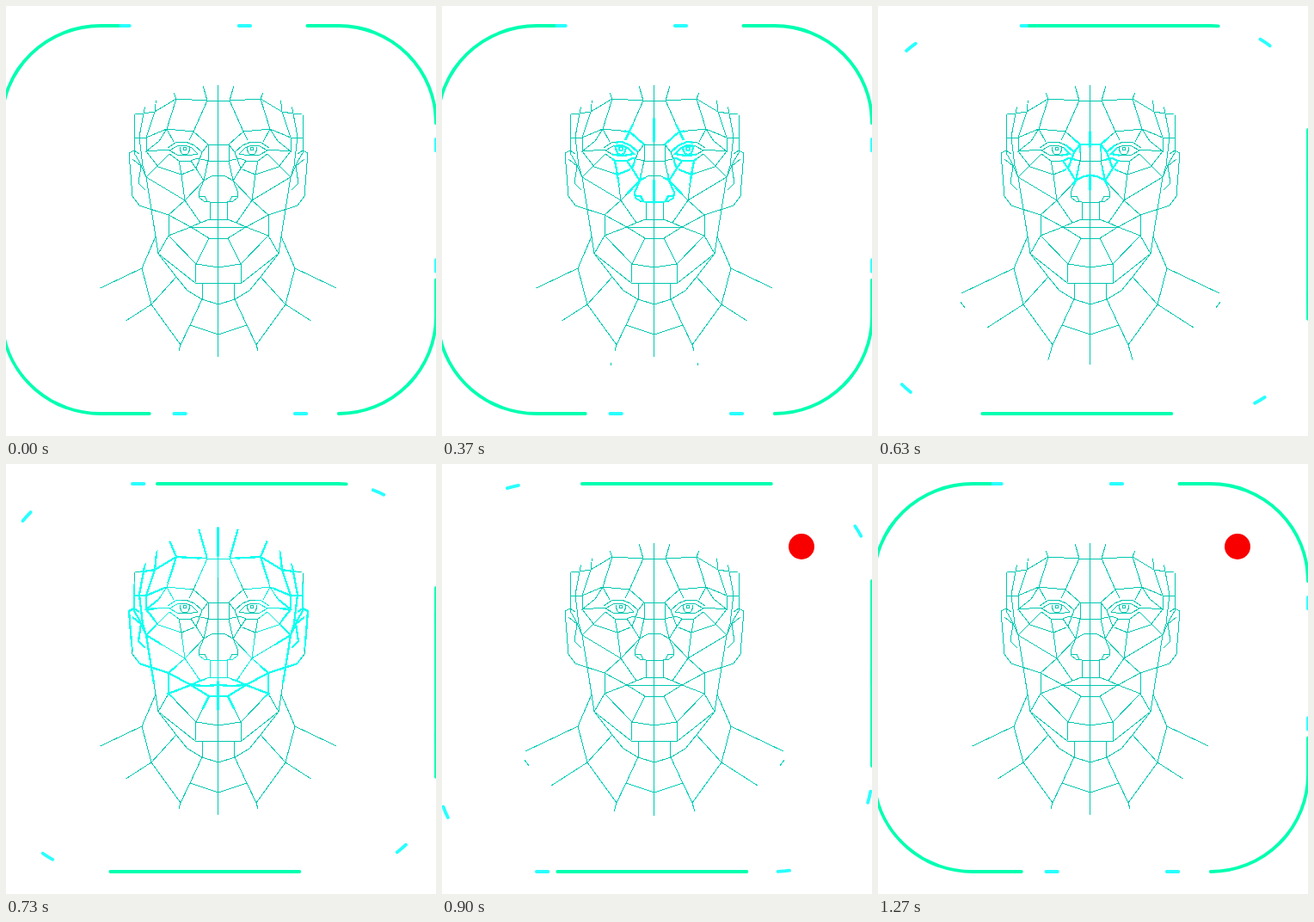
Recreate the animation shown at these times as an HTML page. Size 500 by 500 pixels, loop 1.41 s.

```html
<!DOCTYPE html>
<html lang="en">
<head>
<meta charset="utf-8">
<title>Face scan</title>
<style>
html, body { margin: 0; width: 100%; height: 100%; overflow: hidden; background: #fff; }
svg { display: block; width: 100vw; height: 100vh; }
path, circle { fill: none; }
#mesh { shape-rendering: crispEdges; }
.ring circle { stroke: #fff; }
#green, #cyan { stroke-width: 3.8; stroke-linecap: round; }
</style>
</head>
<body>
<svg viewBox="0 0 500 500">
  <defs>
    <g id="half">
      <!-- skull -->
      <path d="M149 171V125L150 80 172 53 205 44 247 38M186 34 172 53 180 65 198 108 187 143
        M200 30 205 44 222 68 234 110 218 146M205 44 180 65 167 89 160 125 155 152 159 186 163 199
        M150 80 176 95 194 80 222 68 247 63M176 95 173 123 163 153M149 125H160L173 123 198 108 234 110H247
        M149 153H163L187 143 218 146 235 161H247M163 153V169"/>
      <!-- ear -->
      <path d="M155 172 149 168 143 171 147 221 155 232M147 178 157 186 154 206 162 214M149 171 155 181 163 199"/>
      <!-- eye -->
      <path d="M187 143 178 157 163 169 190 167M187 143 195 158M218 146 213 156M188 165 197 159 209 158 219 162 228 170
        M190 168 199 163 209 162 216 165 223 172 211 174 199 173 190 168M190 172 201 180H215L222 177
        M202 164Q203 173 208 173T214 164"/>
      <circle cx="208" cy="166" r="2"/>
      <!-- cheek -->
      <path d="M163 169 177 187 204 196 219 190M190 172 163 199 208 226 189 243M201 180 204 196 208 226 230 203M208 226 226 252
        M155 232 189 243 215 257M163 199 174 268 177 288M215 180 221 189"/>
      <!-- nose -->
      <path d="M235 161 228 170 221 189 230 203 239 198 247 197M235 161V180L230 203 224 217 225 223 230 227 237 228H247M235 180H247
        M224 221H231L234 227M237 228V248M222 177 235 180"/>
      <!-- mouth and chin -->
      <path d="M189 243V267L177 288 220 322H247M226 252 237 248 247 249M215 257 226 252M215 257 232 258 247 257
        M215 257 236 270H247M215 257 189 267 221 300 247 304M236 270 221 300 220 322"/>
      <!-- neck -->
      <path d="M177 288 198 315 211 331 228 341 247 347M229 323 228 341 214 371 203 394 196 418M214 371 247 382
        M174 268 158 305 97 334M158 305 169 347 127 374M198 315 169 347 203 394M96 344 101 351"/>
    </g>
    <g id="mesh">
      <use href="#half"/>
      <use href="#half" transform="matrix(-1 0 0 1 494 0)"/>
      <path d="M246.5 13V418"/>
    </g>
    <g id="waves"><circle cx="247" cy="180"/><circle cx="247" cy="180"/><circle cx="247" cy="180"/></g>
    <mask id="seen" maskUnits="userSpaceOnUse" x="0" y="0" width="500" height="500">
      <circle cx="247" cy="250" r="158" style="fill:#fff"/>
      <g class="ring"></g>
    </mask>
    <mask id="tint" maskUnits="userSpaceOnUse" x="0" y="0" width="500" height="500"><g class="ring"></g></mask>
    <mask id="lit" maskUnits="userSpaceOnUse" x="0" y="0" width="500" height="500"><g class="ring"></g></mask>
    <path id="frame" d="M500 136V361A113 113 0 0 1 387 474H110A115 113 0 0 1 -5 361V136A115 113 0 0 1 110 23H387A113 113 0 0 1 500 136"/>
  </defs>
  <g mask="url(#seen)" stroke="#00c8b0"><use href="#mesh"/></g>
  <g mask="url(#tint)" stroke="#08ecdc"><use href="#mesh"/></g>
  <g mask="url(#lit)" stroke="#10fff0" stroke-width="2.3"><use href="#mesh"/></g>
  <use id="cyan" href="#frame" stroke="#28ffff" stroke-dasharray="13.5 126.9"/>
  <use id="green" href="#frame" stroke="#00ffb0" stroke-dasharray="220 220"/>
  <circle id="dot" cx="418" cy="96" r="15" style="fill:#f80000"/>
</svg>
<script>
const LOOP = 1410, SPEED = 0.72;
const WAVES = [14, 302, 583];
const TIMES = [370, 500, 630, 800, 1070, 1270];
const GREEN = [181.5, 436, 447, 447, 374, 181.5];
const CYAN = [0, 282, 317, 273, 124, 0];

const $ = id => document.getElementById(id);
const clamp = (v, a, b) => Math.min(b, Math.max(a, v));
const rings = [...document.querySelectorAll('.ring')].map(g => {
  g.append(...$('waves').cloneNode(true).children);
  return [...g.children];
});

// Smooth curve through the keys without overshoot
function curve(vals, t) {
  const last = TIMES.length - 1;
  if (t <= TIMES[0]) return vals[0];
  if (t >= TIMES[last]) return vals[last];
  const i = TIMES.findIndex(k => k > t) - 1;
  const slope = j => (vals[j + 1] - vals[j]) / (TIMES[j + 1] - TIMES[j]);
  const tangent = j => {
    if (j === 0 || j === last) return 0;
    const a = slope(j - 1), b = slope(j);
    return a * b > 0 ? 2 * a * b / (a + b) : 0;
  };
  const h = TIMES[i + 1] - TIMES[i], u = (t - TIMES[i]) / h, w = 1 - u;
  return vals[i] * w * w * (1 + 2 * u) + vals[i + 1] * u * u * (3 - 2 * u)
    + h * u * w * (tangent(i) * w - tangent(i + 1) * u);
}

function setRing(ring, edge, width, alpha) {
  ring.setAttribute('r', Math.max(0, edge - width / 2));
  ring.setAttribute('stroke-width', width);
  ring.setAttribute('stroke-opacity', alpha);
}

// Each wave has a bright front and a tail that shrinks as it leaves the face
function drawWave(i, edge) {
  const tail = Math.max(0, Math.min(edge * 0.55, 75, (270 - edge) * 1.3));
  const fade = clamp((235 - edge) / 60, 0, 1);
  const [seen, tint, lit] = rings.map(set => set[i]);
  setRing(seen, edge, tail, tail ? 1 : 0);
  setRing(tint, edge, tail, fade);
  setRing(lit, edge, Math.min(tail, 34), fade);
}

function draw(now) {
  const raw = now % LOOP;
  const t = raw < 70 ? 0 : Math.min(raw, 1270);
  WAVES.forEach((start, i) => drawWave(i, (t - start) * SPEED));
  $('green').setAttribute('stroke-dashoffset', -(curve(GREEN, t) + 1));
  $('cyan').setAttribute('stroke-dashoffset', -(curve(CYAN, t) + 18.8));
  const phase = t % (LOOP / 4);
  $('dot').setAttribute('visibility', phase > 80 && phase < 260 ? 'visible' : 'hidden');
  $('dot').setAttribute('r', clamp(13 + (phase - 80) / 30, 13, 15));
}

function tick() {
  draw(performance.now());
  requestAnimationFrame(tick);
}
tick();
</script>
</body>
</html>
```
